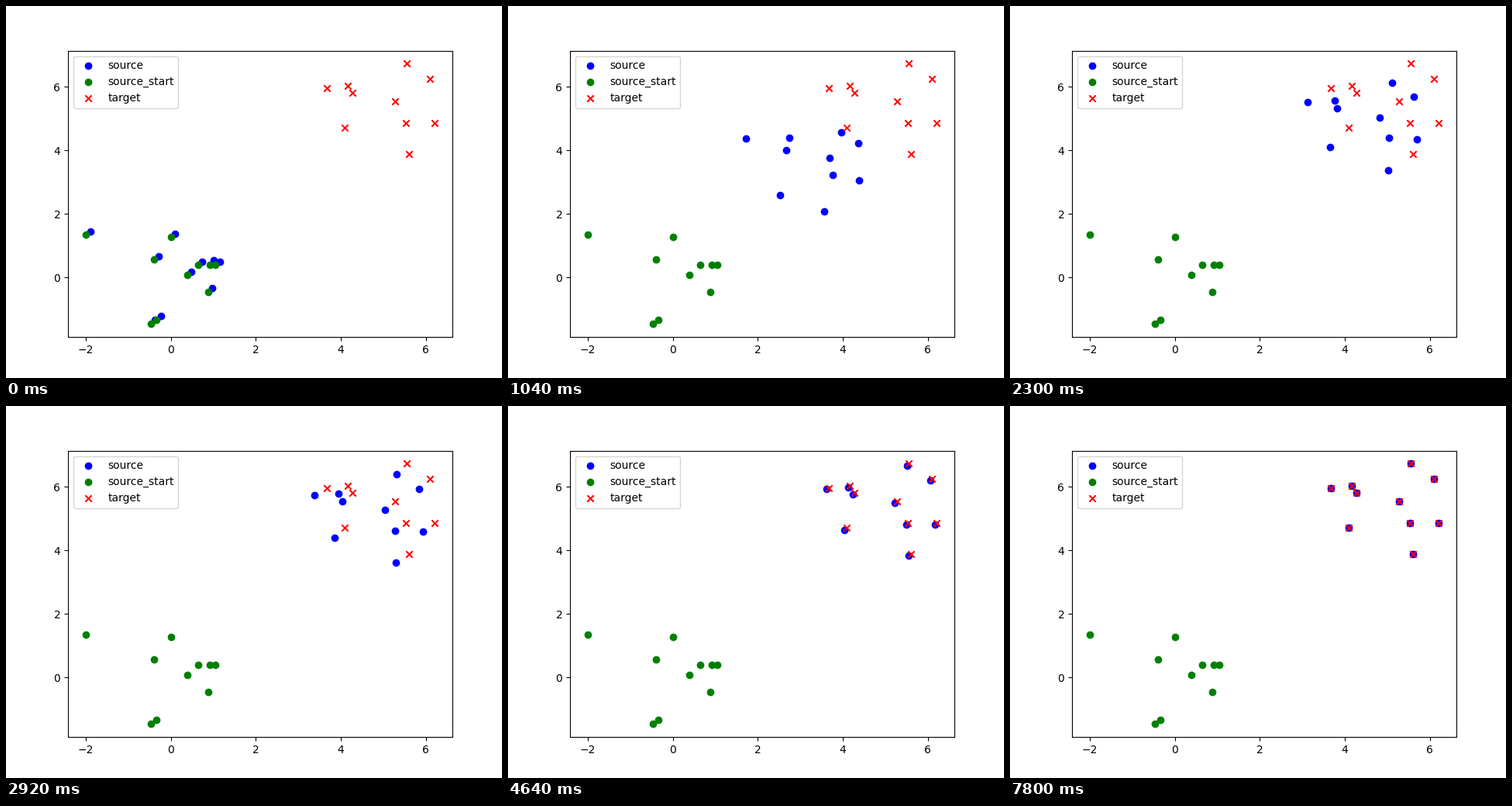
These frames come from a looping animation (640 px wide and 480 px high, 10000 ms). A matplotlib script:

```python
import numpy as np
import matplotlib.pyplot as plt
from matplotlib.animation import FuncAnimation

W, H, DPI = 640, 480, 100
FRAMES, INTERVAL = 500, 20
RATE = 0.02  # share of the remaining way covered per step

# stage position of the data origin and pixels per data unit
ORIGIN = np.array([212.6, 350.0])
SCALE = np.array([54.85, -41.0])


def to_data(px):
    return (np.asarray(px) - ORIGIN) / SCALE


# paired start and goal points, in stage pixels
start = to_data([
    (102.55, 295.0), (213.0, 298.0), (191.4, 327.0), (187.4, 410.4),
    (248.0, 334.0), (263.0, 333.6), (270.4, 334.4), (233.8, 347.4),
    (260.6, 368.8), (193.9, 404.7),
])
goal = to_data([
    (413.81, 105.7), (440.72, 103.14), (446.875, 111.78), (436.6, 157.34),
    (501.75, 123.29), (517.45, 74.4), (547.16, 94.265), (516.18, 151.03),
    (553.45, 150.7), (519.7, 191.41),
])


def position(step):
    return goal + (start - goal) * (1 - RATE) ** step


fig, ax = plt.subplots(figsize=(W / DPI, H / DPI), dpi=DPI)
moving = ax.scatter(*position(1).T, c="b", label="source")
ax.scatter(*start.T, c="g", label="source_start")
ax.scatter(*goal.T, c="r", marker="x", label="target")

left, bottom = to_data((80, 427.2))
right, top = to_data((576, 57.6))
ax.set_xlim(left, right)
ax.set_ylim(bottom, top)
ax.set_xticks(range(-2, 7, 2))
ax.set_yticks(range(0, 7, 2))
ax.legend(loc="upper left")


def update(frame):
    moving.set_offsets(position(frame + 1))
    return (moving,)


anim = FuncAnimation(fig, update, frames=FRAMES, interval=INTERVAL,
                     init_func=lambda: update(0), repeat=True, blit=False)
plt.show()
```
